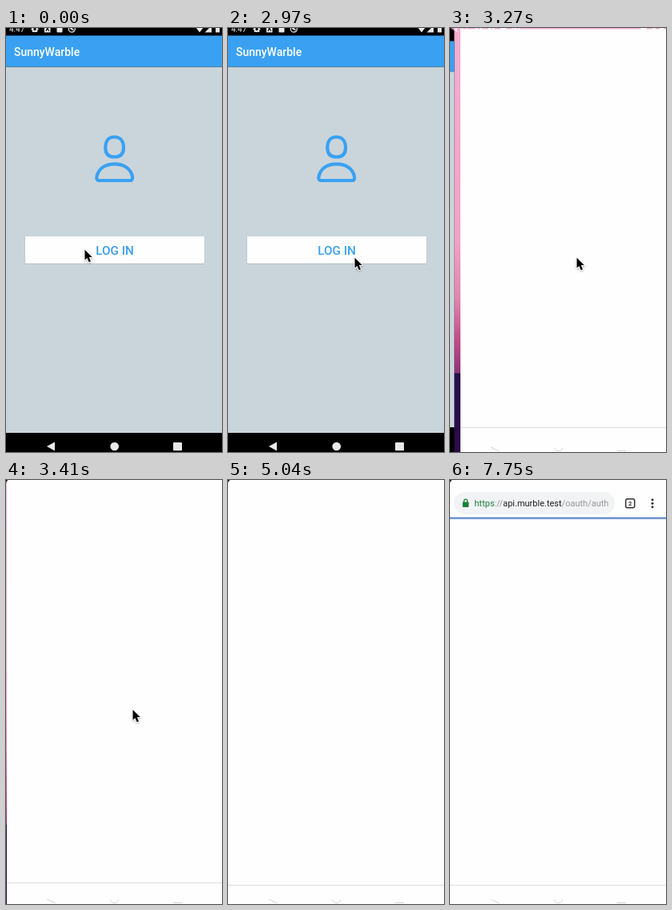
An HTML page that plays this animation: 270 by 531 pixels, repeating every 8000 ms.

```html
<!DOCTYPE html>
<html lang="en">
<head>
<meta charset="utf-8">
<title>Login flow</title>
<style>
  html, body { margin: 0; width: 100%; height: 100%; overflow: hidden; background: #fefefe; }
  svg { display: block; width: 100vw; height: 100vh; }
  text { font-family: Roboto, "Noto Sans", sans-serif; white-space: pre; }
  .medium { font-weight: 500; }
</style>
</head>
<body>
<svg viewBox="0 0 270 531" preserveAspectRatio="none">
  <defs>
    <linearGradient id="sky" x1="0" y1="0" x2="0" y2="1">
      <stop offset="0" stop-color="#f3aed0"/>
      <stop offset=".5" stop-color="#f2a3c3"/>
      <stop offset=".64" stop-color="#e086ab"/>
      <stop offset=".74" stop-color="#c04a86"/>
      <stop offset=".813" stop-color="#8f3577"/>
      <stop offset=".815" stop-color="#25104a"/>
      <stop offset="1" stop-color="#2c0a48"/>
    </linearGradient>
    <filter id="soft" x="-50%" y="-50%" width="200%" height="200%">
      <feDropShadow dx="0" dy="1" stdDeviation=".8" flood-opacity=".35"/>
    </filter>
  </defs>

  <rect width="270" height="531" fill="url(#sky)"/>

  <g id="login">
    <rect x="-2" y="-6" width="275" height="546" fill="#000"/>
    <rect x="-2" y="49" width="275" height="458" fill="#cad5db"/>
    <rect x="-2" y="48.5" width="275" height="1.2" fill="#b3c3cf"/>
    <rect x="-2" y="9.5" width="275" height="39" fill="#3aa1f2"/>
    <text class="medium" x="10" y="34.5" font-size="14" fill="#fff">SunnyWarble</text>
    <g fill="none" stroke="#3aa1f2" stroke-width="4.2" stroke-linejoin="round">
      <path d="M135.5 136.5C127 136.5 124.3 143 124.3 150C124.3 158 128 161.5 135.5 161.5S147 158 147 150C147 143 144 136.5 135.5 136.5Z"/>
      <path d="M116.500 191C113.500 191 112.800 188.500 113.500 186C115.500 176 124 170.300 135.700 170.300S156 176 158 186C158.600 188.500 157.800 191 155 191Z"/>
    </g>
    <rect x="23.500" y="261.500" width="225" height="34.300" rx="1" fill="#b5c0c6"/>
    <rect x="24" y="261" width="224" height="33.800" rx=".8" fill="#fefefe"/>
    <text class="medium" x="136" y="284.300" font-size="15.200" text-anchor="middle" fill="#3a9fee">LOG IN</text>
  </g>

  <g id="page">
    <rect x="-2" y="-6" width="275" height="546" fill="#fefefe"/>
    <rect x="-2" y="507" width="275" height="1" fill="#dedede"/>
    <g id="bar">
      <rect x="5" y="15" width="201" height="28" rx="14" fill="#f1f3f4"/>
      <g id="lock">
        <rect x="15.800" y="27.500" width="7.600" height="6.500" rx=".8" fill="#188038"/>
        <path d="M17.500 28V26.300a2.100 2.100 0 0 1 4.200 0V28" fill="none" stroke="#188038" stroke-width="1.200"/>
      </g>
      <text id="url" y="33" font-size="11"><tspan fill="#188038">https</tspan><tspan fill="#8a9a90">://</tspan><tspan fill="#202124">api.murble.test</tspan><tspan fill="#96999c">/oauth/auth</tspan></text>
      <rect x="219.700" y="23.700" width="11" height="11" rx="2" fill="none" stroke="#333" stroke-width="1.500"/>
      <text x="225.200" y="32" font-size="7.500" font-weight="700" text-anchor="middle" fill="#333">2</text>
      <g fill="#333">
        <circle cx="253" cy="24.700" r="1.500"/>
        <circle cx="253" cy="29.200" r="1.500"/>
        <circle cx="253" cy="33.700" r="1.500"/>
      </g>
      <rect y="47" width="270" height="2.500" fill="#c6daf6"/>
      <rect id="progress" y="46.800" height="1.600" fill="#4472bd"/>
    </g>
  </g>

  <g id="system">
    <text x="4" y="5.300" font-size="10">4:47</text>
    <circle cx="36" cy="1.500" r="2.700" fill="none" stroke="currentColor" stroke-width="2"/>
    <path d="M31.500 1.500h2M38.500 1.500h2M33 4.800l1-1.500M39 4.800l-1-1.500" stroke="currentColor" stroke-width="1.300"/>
    <path fill-rule="evenodd" d="M48 -3h7.500v8.500h-7.500ZM49.500 4l1.800-5h1l1.800 5h-1l-.5-1.500h-1.600l-.5 1.500Z"/>
    <rect x="63.500" y="-2" width="7" height="7.500" rx=".8"/>
    <circle cx="82.300" cy="1.200" r="4" fill="none" stroke="currentColor" stroke-width="1.200"/>
    <path d="M80 0l4.500 2.500M82 -1v3" stroke="currentColor" stroke-width="1.500"/>
    <path d="M237 -1h10l-5 6.500ZM257 -3v8.500h-8.500ZM262 -3h5v8.500h-5Z"/>
    <path d="M51 524L61 518.500V529.500Z"/>
    <circle cx="135.700" cy="524" r="5.300"/>
    <rect x="209" y="519" width="11" height="10.300" rx=".8"/>
  </g>
  <path id="edges" d="M51 525L61.500 530M130.500 525.500Q132 529.800 135.700 529.800T141 525.500M208.500 529.500H220" fill="none" stroke="#cfcfcf" stroke-width=".9"/>
  <path d="M0 0H2.500Q.6 1 0 3.500Z" fill="#000"/>

  <g id="cursor" filter="url(#soft)">
    <path d="M.5 .8V13.600L3.400 10.900L5.700 16.200L8 15.200L5.800 10H9.800Z" fill="#000" stroke="#fff" stroke-width="1.800" stroke-linejoin="round" paint-order="stroke"/>
  </g>
</svg>
<script>
const LOOP = 8000;
const $ = id => document.getElementById(id);

// time, x, y of the pointer tip
const pointer = [
  [0, 98, 277], [580, 68, 290], [730, 26, 300], [880, 62, 302], [1020, 146, 301],
  [1170, 233, 299], [1320, 186, 301], [1470, 144, 300], [1620, 144, 302],
  [1770, 145, 301], [1920, 149, 298], [2070, 154, 294], [2220, 157, 290.5],
  [2970, 158, 287], [3860, 159, 303], [4010, 160, 320], [4160, 176, 350],
  [4310, 199, 401], [4460, 221, 449], [4600, 235, 479], [4750, 241, 491]
];

// time, card scale, page offset
const slide = [
  [0, 1, 275], [3120, .952, 56], [3270, .972, 15], [3410, .988, 3],
  [3560, .995, 1.5], [3710, .998, .6], [3860, 1, 0]
];

// time, progress width, secure flag
const loading = [[7290, 54, 0], [7600, 190, 1], [7750, 270, 1]];

const at = (steps, t) => steps.findLast(s => s[0] <= t) || steps[0];
const show = (id, on) => $(id).setAttribute("visibility", on ? "inherit" : "hidden");
const place = (id, x, y, s = 1) =>
  $(id).setAttribute("transform", `translate(${x} ${y}) scale(${s})`);

function draw(t) {
  const [, x, y] = at(pointer, t);
  place("cursor", x, y);
  show("cursor", t < 5040);

  const [, s, dx] = at(slide, t);
  const dy = 257 * (1 - s);
  const moved = t >= 3120;
  place("page", dx, dy, s);
  place("login", moved ? dx - 275 : 0, dy, s);
  show("page", moved);
  show("login", t < 3410);

  const tone = moved ? "#fefefe" : "#e9e9e9";
  $("system").setAttribute("fill", tone);
  $("system").setAttribute("color", tone);
  show("edges", t >= 3270);

  const [, width, secure] = at(loading, t);
  show("bar", t >= 7290);
  show("lock", secure);
  $("url").setAttribute("x", secure ? 30.5 : 15);
  $("progress").setAttribute("width", width);
}

const start = performance.now();
function tick() {
  draw((performance.now() - start) % LOOP);
  requestAnimationFrame(tick);
}
tick();
</script>
</body>
</html>
```
